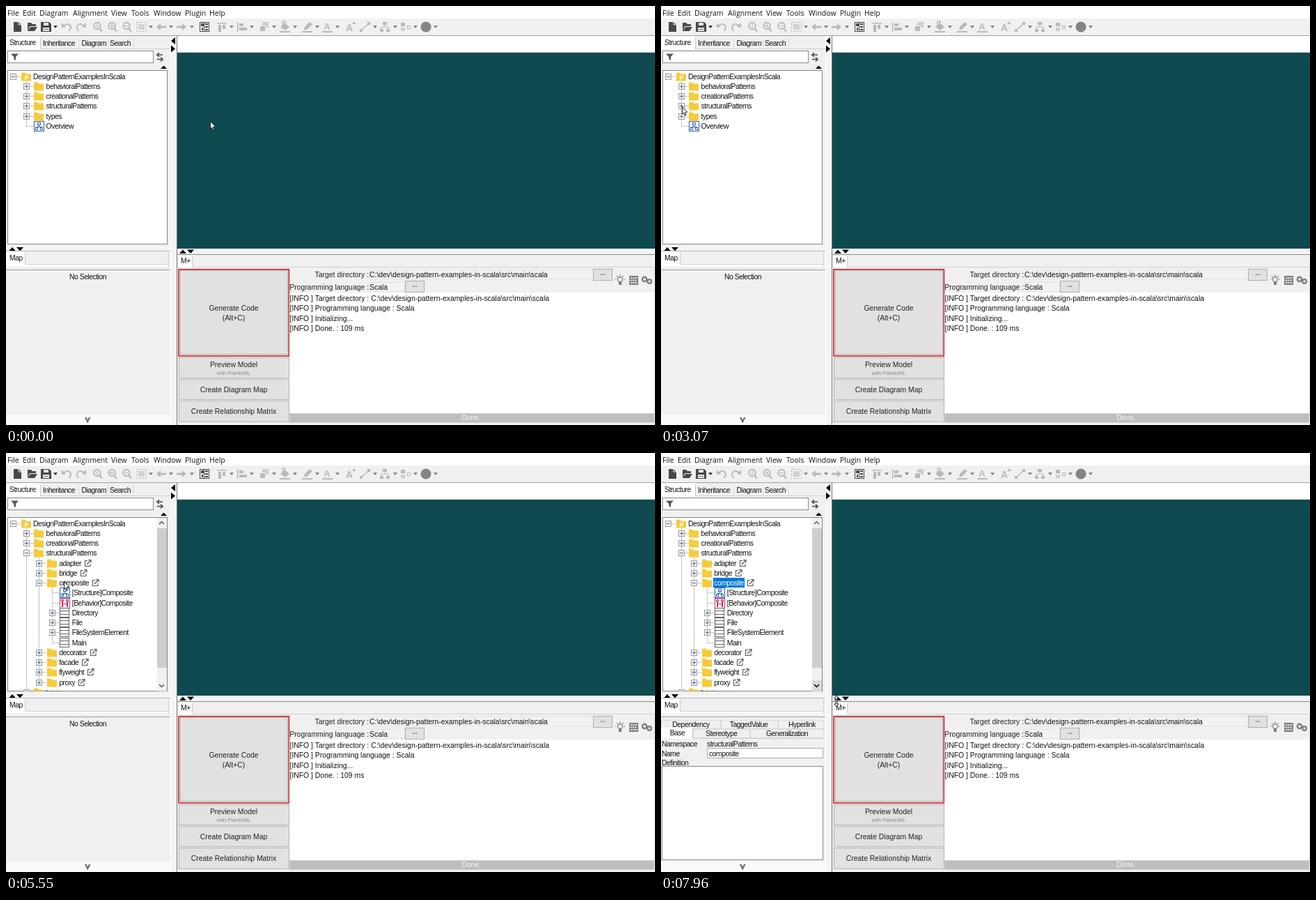
An HTML page with a canvas for the animation above (8000 ms loop, 932 by 601 pixels).

```html
<!DOCTYPE html>
<html lang="en">
<head>
<meta charset="utf-8">
<title>Model tree browsing</title>
<style>
html, body { margin: 0; width: 100%; height: 100%; overflow: hidden; background: #f0f0f0; }
canvas { display: block; }
</style>
</head>
<body>
<canvas id="stage" width="932" height="601"></canvas>
<script>
const g = document.getElementById('stage').getContext('2d');
const LOOP = 8000, ROW = 14.25;
const EXPAND1 = 3220, EXPAND2 = 4860, SELECT = 6410, PROPS = 6480, HOVER = 7730;
const UI = { font: '10.4px "Liberation Sans", Arial, sans-serif', gap: '-0.5px' };
const ARIAL = { font: '10.4px "Liberation Sans", Arial, sans-serif', gap: '0px' };
const MENU = { font: '10.5px "Open Sans", "Noto Sans", sans-serif', gap: '0px' };
const SMALL = { font: '7.5px "Liberation Sans", Arial, sans-serif', gap: '0px' };

// start, end, steps, from x y, to x y, ease-out power for x and y
const MOVES = [
  [1000, 1760, 11, 293, 165, 117, 162, 1, 1],
  [1840, 2610, 11, 117, 162, 33, 147, 2.9, 0.44],
  [2760, 3070, 5, 33, 147, 30, 144, 1, 1],
  [3540, 4310, 11, 30, 144, 47, 178, 1, 1],
  [4390, 4540, 3, 47, 178, 47, 181, 1, 1],
  [5240, 5860, 9, 47, 181, 109, 185, 1.05, 2.5],
  [6790, 7560, 11, 109, 185, 200, 294, 0.9, 0.8],
  [7650, 7960, 5, 200, 294, 252, 356, 1, 1]
];
const CLICKS = [[3220, 3310], [4860, 5010], [6410, 6480]];

function rect(x, y, w, h, fill, line) {
  if (fill) { g.fillStyle = fill; g.fillRect(x, y, w, h); }
  if (line) { g.strokeStyle = line; g.lineWidth = 1; g.strokeRect(x + .5, y + .5, w - 1, h - 1); }
}
function path(pts, fill, line, width = 1, close = !!fill) {
  g.beginPath();
  for (let i = 0; i < pts.length; i += 2) g.lineTo(pts[i], pts[i + 1]);
  if (close) g.closePath();
  if (fill) { g.fillStyle = fill; g.fill(); }
  if (line) { g.strokeStyle = line; g.lineWidth = width; g.stroke(); }
}
function arc(x, y, r, fill, line, width = 1, a = 0, b = Math.PI * 2) {
  g.beginPath();
  g.arc(x, y, r, a, b);
  if (fill) { g.fillStyle = fill; g.fill(); }
  if (line) { g.strokeStyle = line; g.lineWidth = width; g.stroke(); }
}
function text(s, x, y, style = UI, color = '#111', align = 'left') {
  g.font = style.font;
  g.letterSpacing = style.gap;
  g.textAlign = align;
  g.fillStyle = color;
  g.fillText(s, x, y + 3.7);
  return g.measureText(s).width;
}
const tri = (x, y, w, h, color) => path([x - w, y - h, x + w, y - h, x, y + h], color);
const triSide = (x, y, d) => path([x - 3 * d, y, x + 3 * d, y - 5, x + 3 * d, y + 5], '#000');

function toolbar() {
  const dark = '#484848', pale = '#b9b9b9';
  path([11, 23, 18, 23, 22, 27, 22, 37, 11, 37], dark);
  path([18, 23, 18, 27, 22, 27], null, '#f0f0f0');
  path([31, 36, 31, 24, 36, 24, 38, 26, 43, 26, 43, 29, 34, 29], dark);
  path([31, 36, 35, 30, 45, 30, 41, 36], dark);
  path([50, 23, 62, 23, 65, 26, 65, 37, 50, 37], dark);
  rect(54, 24, 7, 4, '#e8e8e8');
  rect(53, 31, 9, 5, '#e8e8e8');
  rect(54, 33, 7, 1, '#777');

  for (const [x, d] of [[87, 1], [108, -1]]) {
    arc(x + d, 31, 5, null, pale, 2, d > 0 ? -2.6 : -4.2, d > 0 ? 1.1 : -.5);
    path([x - 7 * d, 24, x - 7 * d, 31, x - d, 30], pale);
  }
  for (const [x, mark] of [[131, '1'], [152, '+'], [173, '-']]) {
    arc(x, 28.5, 4.7, null, pale, 2);
    path([x + 3, 32, x + 7, 36.5], null, pale, 2.5);
    if (mark !== '1') rect(x - 2.5, 28, 5, 1.3, pale);
    if (mark !== '-') rect(x - .6, 26, 1.3, 5, pale);
  }
  g.setLineDash([3, 2]);
  rect(187, 23, 15, 14, null, pale);
  g.setLineDash([]);
  rect(190, 26, 9, 8, '#d2d2d2');
  for (const [x, d] of [[223, 1], [252, -1]]) {
    path([x - 7 * d, 30, x - d, 25, x - d, 28.5, x + 7 * d, 28.5, x + 7 * d, 31.5, x - d, 31.5, x - d, 35], pale);
  }
  rect(278, 23, 14, 14, '#eee', dark);
  rect(280, 25, 4, 4, dark);
  rect(281, 31, 2, 4, dark);
  for (const y of [25, 29, 33]) rect(286, y, 4, 2, dark);
  rect(284, 24, 1, 12, dark);

  rect(303, 24, 14, 1.5, pale);
  rect(305, 27, 4, 10, pale);
  rect(311, 27, 4, 6, pale);
  rect(332, 23, 1.5, 14, pale);
  rect(335, 25, 6, 4, pale);
  rect(335, 31, 11, 4, pale);
  rect(368, 23, 9, 8, '#cfcfcf');
  rect(364, 28, 9, 9, pale, '#f0f0f0');
  path([394, 30, 400, 24, 407, 30, 401, 35], pale);
  path([397, 27, 397, 22, 401, 22, 401, 26], null, pale, 1.3);
  rect(393, 36, 15, 2, pale);
  path([428, 34, 429, 30, 436, 23, 440, 26, 432, 34], pale);
  rect(425, 36, 15, 2, pale);
  for (const [x, s] of [[461, 13], [493, 14]]) {
    g.font = `bold ${s}px "Liberation Sans", Arial, sans-serif`;
    g.letterSpacing = '0px';
    g.textAlign = 'center';
    g.fillStyle = pale;
    g.fillText('A', x, s === 13 ? 34 : 36);
  }
  rect(454, 36, 15, 2, pale);
  path([497, 26, 500, 22, 503, 26], pale);
  path([510, 35, 521, 25], null, pale, 1.5);
  rect(508, 33, 4, 4, pale);
  rect(519, 23, 4, 4, pale);
  rect(541, 23, 6, 4, pale);
  path([539, 33, 539, 30, 549, 30, 549, 33], null, pale);
  rect(543.5, 27, 1, 3, pale);
  rect(537, 33, 5, 4, pale);
  rect(546, 33, 5, 4, pale);
  rect(567, 24, 6, 5, pale);
  rect(567, 31, 6, 5, '#cfcfcf');
  rect(576, 28, 5, 5, null, pale);
  arc(603, 30, 7, '#858585', '#777');
  for (const x of [208, 237, 267, 324, 353, 385, 415, 447, 476, 530, 559, 588, 617]) tri(x, 30, 3, 1.8, '#777');
  tri(71, 30, 3, 1.8, '#222');
}

function leftFrame() {
  rect(0, 42, 236, 559, '#f0f0f0');
  rect(0, 43, 50, 19, '#fff');
  rect(49, 45, 1, 17, '#c8c8c8');
  for (const x of [104, 146, 183]) rect(x, 46, 1, 15, '#dedede');
  rect(50, 61, 186, 1, '#d0d0d0');
  text('Structure', 5, 52);
  text('Inheritance', 53, 53.5);
  text('Diagram', 108.5, 53.5);
  text('Search', 149, 53.5);
  rect(2, 64, 210, 18, '#fff', '#8c8c8c');
  path([7, 68.5, 18, 68.5, 14, 73, 14, 78, 11.3, 76, 11.3, 73], '#555');
  path([225, 70, 217, 70, 220, 67], null, '#444', 1.4);
  path([217, 70, 220, 73], null, '#444', 1.4);
  path([217, 76.5, 225, 76.5, 222, 73.5], null, '#444', 1.4);
  path([225, 76.5, 222, 79.5], null, '#444', 1.4);
  path([222, 90, 231, 90, 226.5, 85.5], '#000');
  rect(0, 345, 236, 7, '#f4f4f4');
  path([4, 351.5, 14, 351.5, 9, 346], '#000');
  tri(20, 348.8, 5, 2.8, '#000');
  rect(0, 352, 28, 19, '#fff');
  rect(27, 353, 1, 17, '#c8c8c8');
  rect(0, 351, 236, 1, '#b4b4b4');
  rect(28, 370, 206, 1, '#cfcfcf');
  rect(0, 371, 234, 3, '#fff');
  rect(233, 353, 1, 21, '#d0d0d0');
  rect(0, 378, 236, 1, '#a0a0a0');
  text('Map', 5, 361.5);
  rect(0, 586, 236, 15, '#fafafa');
  path([113, 590, 115.5, 590, 117.2, 594, 119, 590, 121.5, 590, 117.2, 598.5], '#666');
}

function props(shown) {
  if (!shown) return text('No Selection', 117.5, 388.5, UI, '#111', 'center');
  for (const [x, w, y] of [[0, 86, 383], [86, 82, 383], [168, 66, 383], [46, 82, 396], [128, 106, 396]]) {
    rect(x, y, w, 13, '#f0f0f0', '#dadada');
  }
  rect(0, 394, 46, 16, '#fff');
  rect(45, 395, 1, 14, '#c8c8c8');
  rect(46, 409, 188, 1, '#d0d0d0');
  const mid = (s, x, y) => text(s, x, y, UI, '#111', 'center');
  mid('Dependency', 43, 389.5);
  mid('TaggedValue', 126, 389.5);
  mid('Hyperlink', 202.5, 389.5);
  mid('Base', 23.5, 401);
  mid('Stereotype', 87, 402.5);
  mid('Generalization', 181, 402.5);
  text('Namespace', 1, 417.5);
  text('structuralPatterns', 66, 417.5);
  text('Name', 1, 431);
  rect(66, 423, 167, 15, '#fff', '#a9a9a9');
  text('composite', 69, 431);
  text('Definition', 1, 444);
  rect(1, 449, 232, 135, '#fff', '#8a8a8a');
}

function rightSide() {
  rect(236, 42, 10, 559, '#f4f4f4');
  rect(236, 43, 1, 558, '#fff');
  triSide(240, 50, 1);
  triSide(240, 61.5, -1);
  rect(245, 42, 687, 25, '#fff');
  rect(246, 66, 686, 1, '#c8c8c8');
  rect(246, 67, 686, 281, '#0f4a50');
  rect(245, 42, 1, 559, '#777');
  rect(246, 348, 686, 253, '#f0f0f0');
  rect(246, 348, 686, 9, '#f4f4f4');
  path([249, 355, 259, 355, 254, 349.5], '#000');
  tri(265, 352.2, 5, 2.8, '#000');
  rect(246, 356, 686, 1, '#8a8a8a');
  rect(247, 358, 21, 17, '#fff');
  rect(267, 359, 1, 15, '#c8c8c8');
  rect(268, 374, 664, 1, '#d0d0d0');
  text('M+', 251, 365.5);

  rect(248, 377, 159, 125, '#e1e1e1');
  rect(250, 379, 155, 121, null, '#b5b5b5');
  g.strokeStyle = '#cc1f24';
  g.lineWidth = 1.6;
  g.strokeRect(248, 377.8, 158.4, 124.2);
  for (const [y, h] of [[504, 30], [535, 30], [566, 31]]) rect(248, y, 159, h, '#e1e1e1', '#b4b4b4');
  const mid = (s, y, style = ARIAL, c = '#222') => text(s, 327, y, style, c, 'center');
  mid('Generate Code', 433);
  mid('(Alt+C)', 447.5);
  mid('Preview Model', 514);
  mid('with PlantUML', 525, SMALL, '#888');
  mid('Create Diagram Map', 550.5);
  mid('Create Relationship Matrix', 581.5);

  const dir = 'C:\\dev\\design-pattern-examples-in-scala\\src\\main\\scala';
  rect(521, 378, 323, 14, '#f2f2f2', '#e2e2e2');
  rect(521, 396, 52, 14, '#f2f2f2', '#e2e2e2');
  text('Target directory :', 521, 385, ARIAL, '#222', 'right');
  text(dir, 522, 385, ARIAL);
  text('Programming language :', 521, 403, ARIAL, '#222', 'right');
  text('Scala', 522, 403, ARIAL);
  for (const [x, y] of [[843, 377], [573, 394]]) {
    rect(x, y, 28, 17, '#e1e1e1', '#adadad');
    for (let i = 0; i < 3; i++) rect(x + 11 + i * 2.5, y + 7.5, 1.2, 1.2, '#333');
  }
  const ink = '#7c7c7c';
  arc(882, 392, 3.5, null, ink, 1.3);
  rect(880, 396, 4, 4, ink);
  for (let i = 0; i < 5; i++) {
    const a = Math.PI * (1 + i / 4), c = Math.cos(a), s = Math.sin(a);
    path([882 + c * 5.3, 392 + s * 5.3, 882 + c * 7, 392 + s * 7], null, ink, 1.2);
  }
  rect(895, 387, 13, 13, ink);
  for (let r = 0; r < 3; r++) for (let c = 0; c < 3; c++) rect(897 + c * 3.5 - (r % 2), 389 + r * 3.5, 2.5, 2, '#e4e4e4');
  arc(917, 392, 3.2, null, ink, 2.4);
  arc(924, 395, 2.8, null, ink, 2.2);

  rect(407, 411, 525, 173, '#fff');
  ['Target directory : ' + dir, 'Programming language : Scala', 'Initializing...', 'Done. : 109 ms']
    .forEach((s, i) => text('[INFO ] ' + s, 407.5, 419.5 + i * 14.25, ARIAL));
  rect(407, 584, 524, 14, '#bebebe', '#d2d2d2');
  text('Done.', 668, 590.5, ARIAL, '#f4f4f4', 'center');
  rect(931, 376, 1, 222, '#d9d9d9');
}

function treeRows(t) {
  const open = t >= EXPAND1, deep = t >= EXPAND2;
  const rows = [
    [0, 'root', 'DesignPatternExamplesInScala', '-'],
    [1, 'dir', 'behavioralPatterns', '+'],
    [1, 'dir', 'creationalPatterns', '+'],
    [1, 'dir', 'structuralPatterns', open ? '-' : '+']
  ];
  if (open) for (const name of ['adapter', 'bridge', 'composite', 'decorator', 'facade', 'flyweight', 'proxy']) {
    const full = deep && name === 'composite';
    rows.push([2, 'dir', name, full ? '-' : '+']);
    if (full) rows.push(
      [3, 'struct', '[Structure]Composite'], [3, 'behave', '[Behavior]Composite'],
      [3, 'class', 'Directory', '+'], [3, 'class', 'File', '+'],
      [3, 'class', 'FileSystemElement', '+'], [3, 'class', 'Main']);
  }
  rows.push([1, 'dir', 'types', '+'], [1, 'struct', 'Overview']);
  return rows;
}

function icon(kind, x, y) {
  if (kind === 'dir' || kind === 'root') {
    path([x, y - 5.5, x + 5, y - 5.5, x + 7, y - 3.5, x + 14, y - 3.5, x + 14, y + 6.5, x, y + 6.5], '#f6cb3c');
    if (kind === 'root') {
      g.font = 'bold 9px "Liberation Sans", Arial, sans-serif';
      g.textAlign = 'center';
      g.fillStyle = '#fff';
      g.fillText('P', x + 7.5, y + 5);
    }
  } else if (kind === 'class') {
    rect(x, y - 7, 14, 14, '#fff', '#666');
    rect(x, y - 3, 14, 1, '#666');
    rect(x, y + 2, 14, 1, '#666');
  } else if (kind === 'struct') {
    const blue = '#2c62b4';
    rect(x, y - 7, 15, 15, '#fff', blue);
    rect(x + 5, y - 5, 5, 4, null, blue);
    rect(x + 7, y - 1, 1, 2, blue);
    rect(x + 4, y + 1, 7, 1, blue);
    rect(x + 2, y + 2, 4, 4, null, blue);
    rect(x + 9, y + 2, 4, 4, null, blue);
  } else {
    const red = '#cc2f5a';
    rect(x, y - 7, 15, 15, '#fff', red);
    for (const dx of [3, 10]) {
      rect(x + dx - 1, y - 5, 4, 3, null, red);
      rect(x + dx, y - 2, 2, 8, red);
    }
    rect(x + 5, y + 1, 5, 1, red);
  }
}

function scrollbar(hover) {
  rect(217, 93, 14, 249, '#f0f0f0');
  rect(217, 108, 14, 200, '#cdcdcd');
  if (hover) rect(217, 326, 14, 16, '#dadada');
  path([220, 102, 223.5, 98.5, 227, 102], null, '#555', 1.4);
  path([220, 332, 223.5, 335.5, 227, 332], null, hover ? '#000' : '#555', 1.5);
}

function tree(t) {
  rect(2, 92, 230, 250, '#fff', '#858585');
  g.save();
  g.beginPath();
  g.rect(3, 93, 228, 248.5);
  g.clip();
  const rows = treeRows(t), parentY = [];
  const yOf = i => Math.round(100.5 + i * ROW);
  const axis = d => Math.round(10 + d * 18.6);
  rows.forEach(([d], i) => {
    const y = yOf(i), x = axis(d);
    parentY[d] = y;
    rect(x, y, 11, 1, '#c4c4c4');
    if (d) rect(x, parentY[d - 1] + 7, 1, y - parentY[d - 1] - 7, '#c4c4c4');
  });
  rows.forEach(([d, kind, name, sign], i) => {
    const y = yOf(i), x = axis(d), tx = 39 + d * 18.6;
    if (sign) {
      rect(x - 4, y - 4, 9, 9, '#f6f6f6', '#9a9a9a');
      rect(x - 2, y, 5, 1, '#4b639a');
      if (sign === '+') rect(x, y - 2, 1, 5, '#4b639a');
    }
    icon(kind, Math.round(21.5 + d * 18.6), y);
    const picked = name === 'composite' && t >= SELECT;
    if (picked) rect(75, y - 7, 45, 14, '#0078d7');
    const end = tx + text(name, tx, y, UI, picked ? '#fff' : '#111');
    if (d === 2) {
      const lx = Math.round(end + 5);
      path([lx + 4, y - 3.5, lx + .5, y - 3.5, lx + .5, y + 4.5, lx + 8, y + 4.5, lx + 8, y + 1], null, '#555', 1.1);
      path([lx + 3, y + 2, lx + 8.5, y - 4], null, '#555', 1.2);
      path([lx + 5, y - 4.5, lx + 9, y - 4.5, lx + 9, y - .5], null, '#555', 1.2);
    }
  });
  if (t >= EXPAND2) scrollbar(t >= HOVER);
  g.restore();
}

function pointer(t) {
  let x = 293, y = 165;
  for (const [t0, t1, n, x0, y0, x1, y1, kx, ky] of MOVES) {
    if (t < t0) break;
    const step = Math.floor((t - t0) / ((t1 - t0) / (n - 1)) + .08) + 1;
    const left = 1 - Math.min(1, step / n);
    x = Math.round(x1 + (x0 - x1) * left ** kx);
    y = Math.round(y1 + (y0 - y1) * left ** ky);
  }
  return [x, y];
}

function drawPointer(t) {
  const [x, y] = pointer(t);
  g.save();
  g.translate(x, y);
  if (y >= 349) {
    path([0, -8, 3.2, -4, 1, -4, 1, 4, 3.2, 4, 0, 8, -3.2, 4, -1, 4, -1, -4, -3.2, -4], '#fff', '#000', .9);
  } else {
    path([.5, .5, .5, 11.2, 2.9, 9, 4.6, 13, 6.3, 12.2, 4.7, 8.4, 7.8, 8.2], '#fff', '#111', .9);
  }
  if (CLICKS.some(([a, b]) => t >= a && t < b)) {
    arc(0, 0, 10, null, '#000');
    arc(0, 0, 9, null, '#fff');
  }
  g.restore();
}

function draw(t) {
  rect(0, 0, 932, 601, '#f0f0f0');
  rect(0, 0, 932, 19, '#fff');
  const menu = { File: 2, Edit: 24, Diagram: 48, Alignment: 96, View: 151, Tools: 180, Window: 212, Plugin: 257, Help: 292 };
  for (const name in menu) text(name, menu[name], 10, MENU);
  rect(0, 18, 932, 1, '#f0f0f0');
  toolbar();
  leftFrame();
  rightSide();
  rect(0, 42, 932, 1, '#a0a0a0');
  tree(t);
  props(t >= PROPS);
  drawPointer(t);
}

const start = performance.now();
function tick() {
  draw((performance.now() - start) % LOOP);
  requestAnimationFrame(tick);
}
tick();
</script>
</body>
</html>
```
